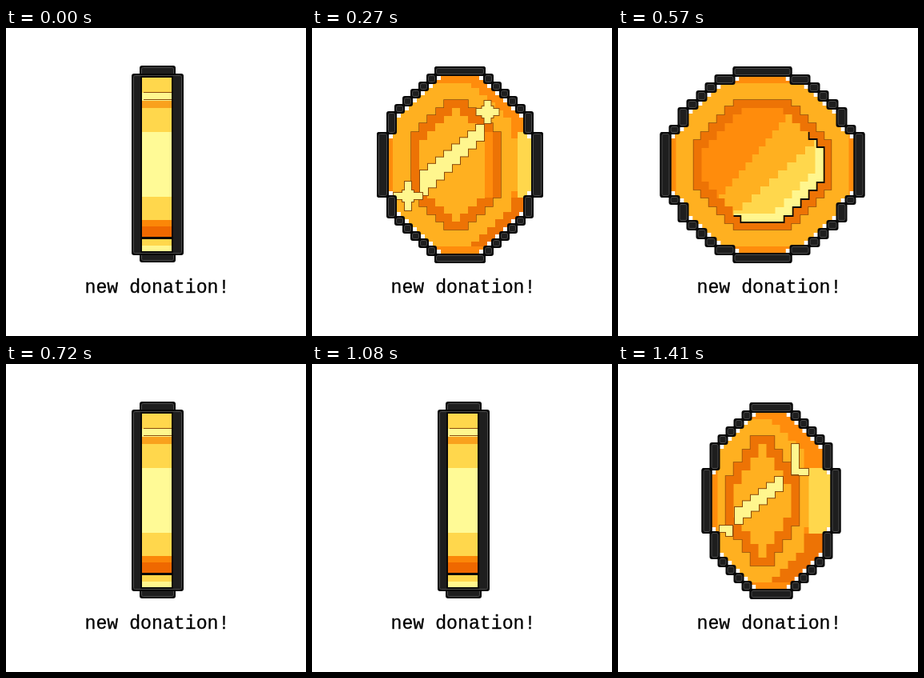
An HTML page with a canvas for the animation above (1440 ms loop, 375 by 385 pixels).

```html
<!DOCTYPE html>
<html lang="en">
<head>
<meta charset="utf-8">
<title>New donation</title>
<style>
html, body { margin: 0; width: 100%; height: 100%; overflow: hidden; background: #fff; }
canvas { display: block; }
</style>
</head>
<body>
<canvas id="stage" width="375" height="385"></canvas>
<script>
const ctx = document.getElementById('stage').getContext('2d');
const CY = 171, POSE_MS = 60, CELL = 10;
const INK = '#080808', BROWN = '#8a4a0c', DEEP = '#ed7305', DARK = '#ff8c0c',
      LIGHT = '#ffb020', GOLD = '#ffd74c', PALE = '#fff68e';

// Corners of a stepped outline, as [half width, half height]
function stairs([w1, h1], [w2, h2], count) {
  return Array.from({ length: count }, (_, i) => {
    const k = i / (count - 1);
    return [Math.round(w1 + (w2 - w1) * k), Math.round(h1 + (h2 - h1) * k)];
  });
}

const shapes = {
  wide: {
    outer: [[37, 123], ...stairs([60, 113], [106, 72], 5), [117, 50], [128, 41]],
    rim: [[36, 81], ...stairs([47, 73], [77, 41], 4), [86, 31]]
  },
  mid: {
    outer: [...stairs([32, 123], [92, 67], 7), [104, 41]],
    rim: [...stairs([15, 81], [46, 52], 4), [56, 41]]
  },
  slim: {
    outer: [...stairs([27, 123], [77, 73], 6), [87, 41]],
    rim: stairs([15, 81], [46, 31], 4)
  }
};

// depth: visible thickness, negative on the left
const poses = [
  { edge: true },
  { ...shapes.slim, cx: 191.5, faceCx: 202.5, depth: -28 },
  { ...shapes.mid, cx: 185, faceCx: 190.5, depth: -20 },
  { ...shapes.wide, cx: 180.5, faceCx: 180.5, depth: 0 },
  { ...shapes.mid, cx: 185, faceCx: 180, depth: 20, glint: midGlint },
  { ...shapes.slim, cx: 191.5, faceCx: 180.5, depth: 28, glint: slimGlint }
];

function box(color, x1, y1, x2, y2) {
  ctx.fillStyle = color;
  ctx.fillRect(x1, y1, x2 - x1, y2 - y1);
}

function disc(corners, cx, inset, dx = 0, dy = 0) {
  const path = new Path2D();
  for (const [w, h] of corners)
    path.rect(cx - w + inset + dx, CY - h + inset + dy, 2 * (w - inset), 2 * (h - inset));
  return path;
}

function fill(color, path) {
  ctx.fillStyle = color;
  ctx.fill(path);
}

function within(path, draw) {
  ctx.save();
  ctx.clip(path);
  draw();
  ctx.restore();
}

function block(x, y, w, h) {
  ctx.beginPath();
  ctx.roundRect(x, y, w, h, 3);
  ctx.fillStyle = INK;
  ctx.fill();
  ctx.beginPath();
  ctx.roundRect(x + 2.5, y + 2.5, w - 5, h - 5, 2);
  ctx.fillStyle = '#1e1e1e';
  ctx.fill();
  ctx.strokeStyle = '#484848';
  ctx.lineWidth = 1;
  ctx.stroke();
}

// One rounded block per step, in all four quadrants
function outline(corners, cx) {
  corners.forEach(([w, h], i) => {
    const bw = i ? w - corners[i - 1][0] + 3 : 2 * w;
    const bh = i < corners.length - 1 ? h - corners[i + 1][1] + 3 : 2 * h;
    for (const x of [cx - w, cx + w - bw])
      for (const y of [CY - h, CY + h - bh]) block(x, y, bw, bh);
  });
}

// Everything right of a stepped diagonal
function slope(color, xTop, yTop, xEnd, yEnd) {
  for (let y = yTop; y < 252; y += CELL)
    box(color, xTop + (xEnd - xTop) * (y - yTop) / (yEnd - yTop), y, 300, y + CELL);
}

// Pale pixels with one thin contour
function pale(rects) {
  for (const [x1, y1, x2, y2] of rects) box(BROWN, x1 - 1, y1 - 1, x2 + 1, y2 + 1);
  for (const rect of rects) box(PALE, ...rect);
}

function star(x, y, r) {
  pale([[4, r], [r, 4], [7, 7]].map(([w, h]) => [x - w, y - h, x + w, y + h]));
}

function gleam(x1, x2, top, topRise, bottom, bottomRise) {
  const columns = [];
  for (let x = x1; x < x2; x += CELL) {
    const k = (x - x1) / (x2 - x1 - CELL);
    columns.push([x, top - topRise * k, x + CELL, bottom - bottomRise * k]);
  }
  pale(columns);
}

function midGlint() {
  box(DARK, 216, 130, 226, 212);
  gleam(135, 215, 178, 57, 209, 68);
  star(219.5, 105, 14);
  star(120, 210, 18);
}

function slimGlint() {
  gleam(146, 206, 179, 38, 200, 41);
  pale([[217, 100, 226, 138], [226, 131, 238, 139]]);
  pale([[127, 202, 143, 210], [135, 208, 143, 215]]);
}

function body({ outer, cx, depth }) {
  const [topW, topH] = outer[0], [sideW, sideH] = outer.at(-1);
  const left = cx - sideW + 12, right = cx + sideW - 12;
  fill(depth < 0 ? GOLD : DARK, disc(outer, cx, 8));
  within(disc(outer, cx, 8), () => {
    if (depth > 0) box(DEEP, cx, CY + sideH, right, CY + topH);
    fill(LIGHT, disc(outer, cx, 8, -depth));
    // Shaded strips behind the four long bars
    box(DARK, cx - topW, CY - topH, cx + topW, CY - topH + 21);
    box(DARK, cx - topW, CY + topH - 21, cx + topW, CY + topH);
    box(DARK, left, CY - sideH, left + 8, CY + sideH);
    box(DARK, right - 8, CY - sideH, right, CY + sideH);
    if (depth > 0) box(GOLD, right - depth, CY - sideH, right, CY + sideH);
    if (depth < 0) {
      box(PALE, left, CY - sideH, left - depth, CY + sideH);
      box(BROWN, left - depth - 1, CY - sideH, left - depth, CY + sideH);
      for (const y of [CY - topH + 14, CY + topH - 22]) box(PALE, cx - topW + 3, y, cx - 9, y + 8);
    }
  });
}

function shadedFace({ rim, faceCx }) {
  const half = rim.at(-1)[0] - CELL, left = faceCx - half, right = faceCx + half;
  const face = disc(rim, faceCx, CELL), corner = new Path2D();
  corner.rect(faceCx - rim[0][0], CY - 41, 200, 200);
  within(corner, () => fill(INK, disc(rim, faceCx, CELL - 2)));
  fill(DARK, face);
  const gold = color => slope(color, right, 128, left + half * .44, 234);
  within(face, () => {
    slope(LIGHT, left + half * 1.38, 108, left + half * .24, 212);
    gold(PALE);
    within(disc(rim, faceCx, CELL, -CELL, -CELL), () => gold(GOLD));
  });
}

function drawCoin(pose) {
  const { outer, cx, rim, faceCx, glint } = pose;
  body(pose);
  const rimPath = disc(rim, faceCx, 0);
  fill(BROWN, disc(rim, faceCx, -.7));
  fill(DEEP, rimPath);
  if (glint) {
    fill(LIGHT, disc(rim, faceCx, CELL));
    glint();
  } else shadedFace(pose);
  outline(outer, cx);
}

function drawEdge() {
  block(167, 47, 45, 246);
  block(157, 57, 65, 227);
  box(INK, 168, 60, 209, 281);
  const stripes = [[62, GOLD], [81, PALE], [91, '#f9a11d'], [100, GOLD], [130, '#fffa96'], [211, GOLD],
                   [240, '#fb8708'], [248, '#ef6800'], [261, INK], [264, GOLD], [272, PALE]];
  for (const [y, color] of stripes) box(color, 170, y, 207, 279);
  for (const y of [80, 89]) box(BROWN, 172, y, 207, y + 1);
}

function frame(now) {
  box('#fff', 0, 0, 375, 385);
  const pose = poses[Math.floor(now / POSE_MS) % poses.length];
  if (pose.edge) drawEdge();
  else drawCoin(pose);
  ctx.font = '23.2px "Liberation Mono", monospace';
  ctx.fillStyle = ctx.strokeStyle = '#000';
  ctx.lineWidth = .3;
  ctx.fillText('new donation!', 98.5, 331);
  ctx.strokeText('new donation!', 98.5, 331);
}

const start = performance.now();
(function loop() {
  frame(performance.now() - start);
  requestAnimationFrame(loop);
})();
</script>
</body>
</html>
```
